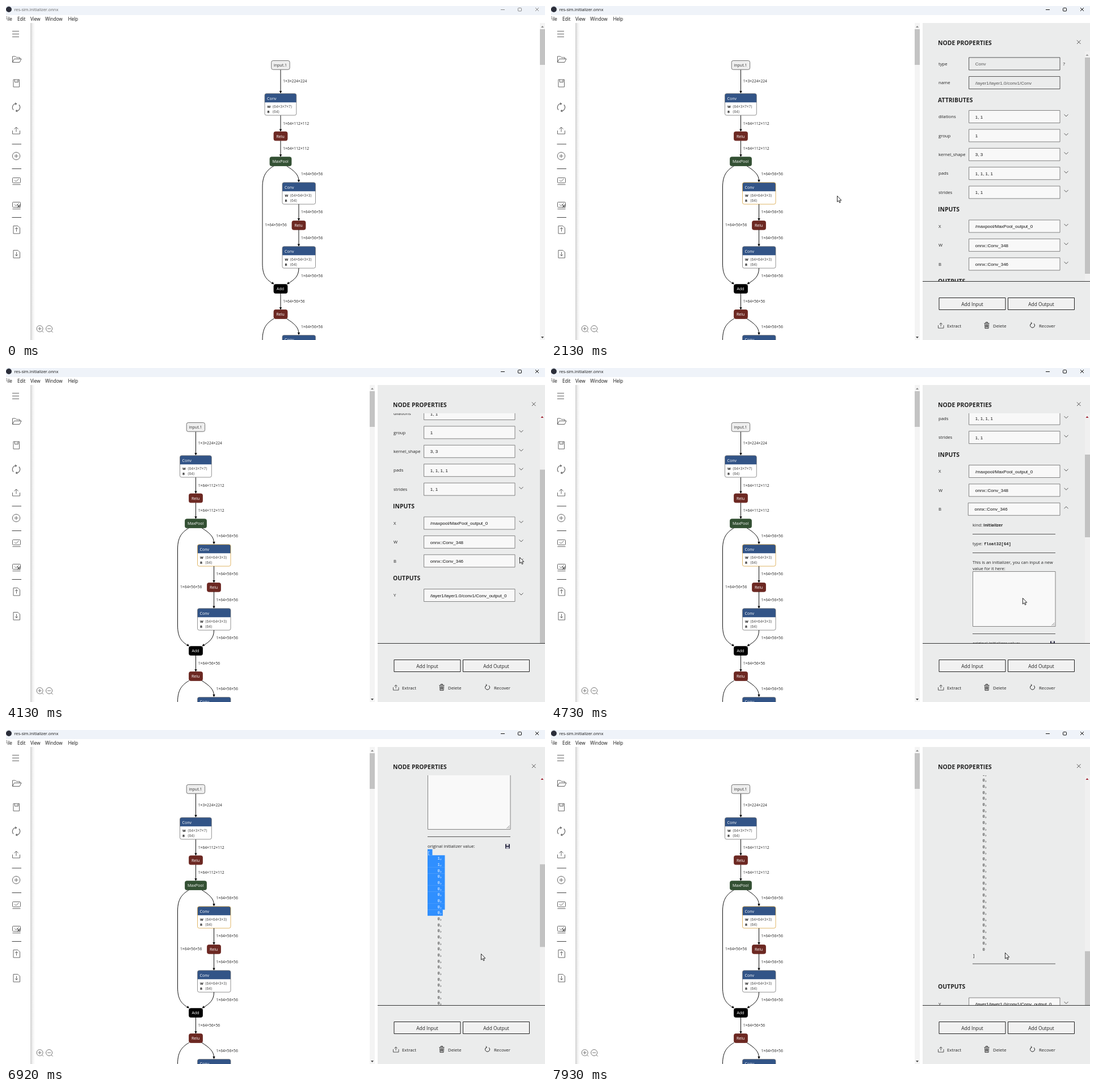
An HTML page with a canvas for the animation above (8000 ms loop, 950 by 590 pixels).

```html
<!DOCTYPE html>
<html lang="en">
<head>
<meta charset="utf-8">
<title>Model editor</title>
<style>
html, body { margin: 0; width: 950px; height: 590px; overflow: hidden; background: #fff; }
canvas { display: block; }
</style>
</head>
<body>
<canvas id="stage" width="950" height="590"></canvas>
<script>
const c = document.getElementById('stage').getContext('2d');
const LOOP = 8000, CLICK = 1880, EXPAND = 4270;
const UI = '"Open Sans", "Noto Sans", sans-serif';
const ARIAL = '"Liberation Sans", sans-serif';
const MONO = '"Liberation Mono", monospace';
const ROW = 10.67, LIST_TOP = 703.5, EXTRA = 966.5;

// Keyframes: time, then one or more values
const cursorKeys = [
  [390, 806, 549], [850, 282, 280], [1120, 282, 280], [1320, 253, 266], [1580, 253, 266],
  [CLICK, 504, 335], [2390, 504, 335], [3170, 863, 442], [3240, 863, 442], [3520, 894, 402],
  [3580, 894, 402], [4000, 896, 331], [4100, 896, 331], [4130, 905, 334], [EXPAND, 905, 334],
  [4730, 831, 406], [4800, 831, 406], [5010, 803, 386], [5080, 803, 386], [5840, 744, 322],
  [6130, 744, 322], [6400, 837, 426], [6590, 837, 395], [7280, 837, 395], [7900, 800, 393]
];
const scrollKeys = [
  [3240, 0], [3520, 22], [3580, 22], [4000, 115], [4400, 115], [4730, 206.5], [4800, 206.5],
  [5010, 380], [6850, 380], [6920, 487.5], [6985, 487.5], [7070, 595], [7280, 595], [7870, 999]
];
const openKeys = [[1930, 0], [2110, 1]];
const selectKeys = [[6130, 0], [6400, 10]];

function at(keys, t) {
  const i = keys.findIndex(k => k[0] > t);
  if (i === 0) return keys[0].slice(1);
  if (i < 0) return keys[keys.length - 1].slice(1);
  const a = keys[i - 1], b = keys[i];
  const u = (t - a[0]) / (b[0] - a[0]), e = u * u * (3 - 2 * u);
  return a.slice(1).map((v, j) => v + (b[j + 1] - v) * e);
}

function text(s, x, y, size, color = '#222', family = UI, weight = '', align = 'left') {
  c.font = `${weight} ${size}px ${family}`;
  c.textAlign = align;
  c.fillStyle = color;
  c.fillText(s, x, y + size * 0.36);
}
function fill(x, y, w, h, color) {
  c.fillStyle = color;
  c.fillRect(x, y, w, h);
}
function box(x, y, w, h, color, stroke, r = 0, lw = 1) {
  c.beginPath();
  c.roundRect(x, y, w, h, r);
  if (color) { c.fillStyle = color; c.fill(); }
  if (stroke) { c.strokeStyle = stroke; c.lineWidth = lw; c.stroke(); }
}
function path(d, color = '#666', lw = 1) {
  c.strokeStyle = color;
  c.lineWidth = lw;
  c.stroke(new Path2D(d));
}
function shape(d, color) {
  c.fillStyle = color;
  c.fill(new Path2D(d));
}
function circle(x, y, r, color = '#666') {
  c.beginPath();
  c.arc(x, y, r, 0, 7);
  c.strokeStyle = color;
  c.lineWidth = 1;
  c.stroke();
}

function chrome(active) {
  fill(0, 0, 950, 16, '#eff3f9');
  fill(0, 16, 950, 14, '#fff');
  c.beginPath();
  c.arc(5, 6, 5, 0, 7);
  c.fillStyle = '#2b2e3a';
  c.fill();
  text('res-sim.initializer.onnx', 14.5, 6.5, 7.4, active ? '#111' : '#666');
  const k = active ? '#111' : '#888';
  path('M872 6.5h7', k);
  box(902.5, 3.5, 6, 5.5, null, k, 1);
  path('M933 3l6 6m0-6l-6 6', k);
  [['File', -2], ['Edit', 20], ['View', 43], ['Window', 69], ['Help', 109.5]]
    .forEach(([s, x]) => text(s, x, 23.5, 8.1, '#111'));
}

function toolbar() {
  const shade = c.createLinearGradient(42, 0, 53, 0);
  shade.addColorStop(0, '#c4c4c4');
  shade.addColorStop(0.4, '#ededed');
  shade.addColorStop(1, '#fff0');
  fill(42, 30, 11, 560, shade);
  fill(0, 30, 43, 560, '#fff');
  path('M11 44.5h12M11 49.5h12M11 54.5h12');
  path('M11.5 99.5V89h5l2 2h6v3M11.5 99.5l3-6H27l-3 6z');
  path('M13 130h10.5v13H13zM15.5 130v4.5h6V130M19.5 131.5v1.5');
  path('M13.2 183.5A6.5 6.5 0 0 1 18 172.5M16 171l2.5 1.5-2 2M22.8 174.5A6.5 6.5 0 0 1 18 185.5M20 187l-2.5-1.5 2-2', '#666', 1.2);
  path('M11.5 220v6h13v-6M18 222.5v-8M14.5 217.5l3.5-3.5 3.5 3.5');
  path('M10.5 244h16.5M10.5 287.5h16.5M10.5 373.5h16.5', '#444');
  circle(18, 265, 6.7);
  path('M14.5 265h7M18 261.5v7');
  for (const y of [303.5, 346.5]) {
    box(11.5, y, 14, 9, null, '#666', 1);
    path(`M11.5 ${y + 12}h14M15 ${y + 4}l2.5 2.5 5-4.5`);
  }
  path('M20 351l5 5m0-5l-5 5', '#555', 1.2);
  for (const [y, dir] of [[395, -1], [438, 1]]) {
    path(`M13 ${y - 6.5}h8l3.5 3.5v10h-11.5zM18.5 ${y - 3.5}v7M16 ${y + dir}l2.5 ${dir * 2.5} 2.5 ${-dir * 2.5}`);
  }
  for (const x of [59.5, 76]) {
    circle(x, 570, 5.5, '#777');
    path(`M${x - 3} 570h6M${x + 4} 574l2.5 2.5`, '#777');
  }
  path('M59.5 567v6', '#777');
}

function node(x, y, w, color, label, ink = '#fff', stroke = color) {
  box(x, y, w, 15.8, color, stroke, 3, 0.8);
  text(label, x + w / 2 - 0.4, y + 8.2, 7, ink, UI, '', 'center');
}
function conv(x, y, w, dims, stroke = '#777') {
  box(x, y, w, 38.3, '#fff', null, 3);
  box(x, y, w, 15.5, '#325487', null, [3, 3, 0, 0]);
  box(x, y, w, 38.3, null, stroke, 3, 0.8);
  text('Conv', x + 4, y + 8.3, 7, '#fff');
  [['W', dims], ['B', '64']].forEach(([k, v], i) => {
    text(k, x + 4.5, y + 23 + i * 9.3, 6, '#111', UI, 'bold');
    text(`⟨${v}⟩`, x + 13.5, y + 23 + i * 9.3, 6.5, '#444', UI + ', "DejaVu Sans"');
  });
}
// Arrow head ending at (x, y); a is the turn from straight down
function head(x, y, a = 0) {
  c.save();
  c.translate(x, y);
  c.rotate(a);
  shape('M0 0l-2.2-4.5h4.4z', '#000');
  c.restore();
}
function down(x, y1, y2) {
  path(`M${x} ${y1}V${y2 - 2}`, '#111');
  head(x, y2);
}
function label(s, x, y) { text(s, x, y, 6.7, '#222'); }

function residual(dy, stroke) {
  const s = '1×64×56×56';
  c.save();
  c.translate(0, dy);
  path('M494.5 282.5C508 291 516 298 516 309', '#111');
  head(516, 311.5);
  path('M472 282.5C460 290 452 298 452 320V455C452 477 460 484 470 490', '#111');
  head(472.5, 491.5, -0.95);
  conv(487, 311.8, 58.5, '64×64×3×3', stroke);
  down(516, 350, 379.5);
  node(504, 379.5, 24, '#6c2822', 'Relu');
  down(516, 395, 425);
  conv(487, 424.8, 58.5, '64×64×3×3');
  path('M516 463C516 477 509 483 497.5 490', '#111');
  head(495, 491.5, 0.95);
  for (const y of [296.5, 364, 409.5, 477]) label(s, 520, y);
  label(s, 456.5, 387);
  c.restore();
}

function graph(open, picked) {
  c.save();
  c.translate(-149.5 * open, 0);
  down(484, 112.5, 154.5);
  down(484, 193, 222);
  down(484, 237.5, 266.8);
  residual(0, picked ? '#d9a441' : undefined);
  residual(269.8);
  down(484, 507, 536.8);
  node(467.7, 96.5, 32.4, '#eee', 'input.1', '#333', '#555');
  conv(456, 154.7, 55.8, '64×3×7×7');
  node(472, 222, 24, '#6c2822', 'Relu');
  node(465, 266.7, 38, '#335033', 'MaxPool');
  node(472, 491.7, 24, '#000', 'Add');
  node(472, 536.6, 24, '#6c2822', 'Relu');
  label('1×3×224×224', 488.3, 133);
  label('1×64×112×112', 488.3, 207.5);
  label('1×64×112×112', 488.3, 252);
  label('1×64×56×56', 488.3, 522);
  c.restore();
  const x = 941 - 300 * open;
  fill(x, 30, 9, 560, '#f4f4f4');
  fill(x, 41, 9, 63, '#c3c3c3');
  shape(`M${x + 2} 38h5l-2.5-3z`, '#888');
  shape(`M${x + 2} 584h5l-2.5 3z`, '#444');
}

function field(name, value, y, kind = '') {
  const fixed = kind === 'fixed', up = kind === 'open';
  const x = up ? 735.3 : 736.6;
  text(name, 683, y, 7.7);
  box(x, y - 11, 897 - x, 22, fixed ? '#ebecec' : '#f8f8f8', fixed ? '#444' : '#777', 0, 0.9);
  text(value, x + 11.2, y + 0.3, 8, fixed ? '#555' : '#111', ARIAL);
  if (!fixed) path(up ? `M904.5 ${y - 1}l3.5-3.5 3.5 3.5` : `M904.5 ${y - 4}l3.5 3.5 3.5-3.5`, '#555');
}
function heading(s, y) { text(s, 682, y, 10.4, '#222', UI, 'bold'); }

function saveIcon(x, y) {
  fill(x - 4, y - 4, 8, 8, '#2d2d45');
  fill(x - 2, y - 4, 4, 3, '#ebecec');
  fill(x - 2.5, y + 1, 5, 3, '#c8c8d4');
}

function initializer(selected) {
  const rule = y => path(`M743 ${y}h146`, '#555');
  text('kind:', 743, 484, 7.6);
  text('Initializer', 762, 484, 7.2, '#222', UI, 'bold');
  rule(500);
  text('type:', 743, 517, 7.6);
  text('float32[64]', 763, 517, 7.27, '#222', MONO, 'bold');
  rule(533);
  text('This is an initializer, you can input a new', 743, 550, 7.6);
  text('value for it here:', 743, 561, 7.6);
  box(743.5, 566, 145.5, 97, '#f9f9f9', '#777', 0, 0.9);
  path('M882.5 661.5l5-5M885.5 661.5l2-2', '#666', 0.8);
  rule(676);
  text('original initializer value:', 743, 693, 7.6);
  saveIcon(884, 693);
  for (let i = 0; i <= 65; i++) {
    const y = LIST_TOP + i * ROW, lit = i <= selected;
    if (lit) fill(743, y - 5.4, i === 0 ? 8.5 : i === Math.floor(selected) ? 26.8 : 30.5, ROW + 0.2, '#2f8fff');
    const s = i === 0 ? '[' : i === 65 ? ']' : (i < 3 ? '1' : '0') + (i < 64 ? ',' : '');
    text(s, i % 65 ? 760.5 : 743, y, 7.27, lit ? '#fff' : '#222', MONO);
  }
  rule(1412);
}

function properties(scroll, expanded, selected) {
  c.save();
  c.beginPath();
  c.rect(655, 80, 295, 406);
  c.clip();
  c.save();
  c.translate(0, -scroll);
  field('type', 'Conv', 102, 'fixed');
  text('?', 902.5, 102, 8);
  field('name', '/layer1/layer1.0/conv1/Conv', 135.5, 'fixed');
  heading('ATTRIBUTES', 166);
  [['dilations', '1, 1'], ['group', '1'], ['kernel_shape', '3, 3'], ['pads', '1, 1, 1, 1'], ['strides', '1, 1']]
    .forEach(([k, v], i) => field(k, v, 195.5 + i * 33.4));
  heading('INPUTS', 359.5);
  field('X', '/maxpool/MaxPool_output_0', 389);
  field('W', 'onnx::Conv_348', 422.4);
  field('B', 'onnx::Conv_346', 455.8, expanded ? 'open' : '');
  if (expanded) initializer(selected);
  c.translate(0, expanded ? EXTRA : 0);
  heading('OUTPUTS', 486);
  field('Y', '/layer1/layer1.0/conv1/Conv_output_0', 516.5);
  c.restore();
  fill(941, 80, 9, 406, '#f0f0f0');
  fill(941, 91 + scroll * (expanded ? 0.3 : 0.77), 9, expanded ? 146 : 382, '#c2c2c2');
  shape('M942.5 88h5l-2.5-3z', scroll > 0 ? '#a02030' : '#999');
  c.restore();
}

function panel(open, scroll, expanded, selected) {
  c.save();
  c.translate(295 * (1 - open), 0);
  fill(655, 30, 295, 560, '#ebecec');
  heading('NODE PROPERTIES', 65.2);
  path('M927 60.5l6.5 6.5m0-6.5l-6.5 6.5', '#555');
  properties(scroll, expanded, selected);
  path('M655 486.5h295', '#333');
  for (const [s, x] of [['Add Input', 684], ['Add Output', 805.5]]) {
    box(x, 515.5, 117, 21, '#f1f1f1', '#222');
    text(s, x + 58.5, 527, 8.4, '#222', UI, '', 'center');
  }
  path('M682.5 564v5h9.5v-5M687.2 566v-6M684.5 562.5l2.7-2.7 2.7 2.7', '#444', 0.9);
  path('M763.5 560.5h9M766.5 560v-1.5h3v1.5M764.5 561.5l.5 8h6l.5-8M766.5 562v6M768 562v6M769.5 562v6', '#222', 0.9);
  path('M847 560.5A4 4 0 1 0 851 561M846 558.5l1.5 2-2 1.5', '#222');
  [['Extract', 698], ['Delete', 779], ['Recover', 860]].forEach(([s, x]) => text(s, x, 565, 7.8));
  c.restore();
}

function cursor(t) {
  const [x, y] = at(cursorKeys, t);
  c.save();
  c.translate(x, y);
  if (t >= 5900 && t < 6420) {
    path('M-1 -1h4M1 -1v10M-1 9h4', '#111');
  } else {
    const arrow = 'M.5 .5V11L2.9 8.8 4.5 12.5 6.2 11.8 4.6 8.2H7.8z';
    shape(arrow, '#fff');
    path(arrow, '#111', 0.9);
  }
  c.restore();
}

function draw(t) {
  const [open] = at(openKeys, t);
  fill(0, 0, 950, 590, '#fff');
  graph(open, t >= CLICK);
  toolbar();
  chrome(t >= 100);
  if (open > 0) panel(open, at(scrollKeys, t)[0], t >= EXPAND, t < 6130 ? -1 : at(selectKeys, t)[0]);
  if (t >= 390) cursor(t);
}

const start = performance.now();
function tick(now) {
  draw(Math.max(0, now - start) % LOOP);
  requestAnimationFrame(tick);
}
draw(0);
requestAnimationFrame(tick);
</script>
</body>
</html>
```
